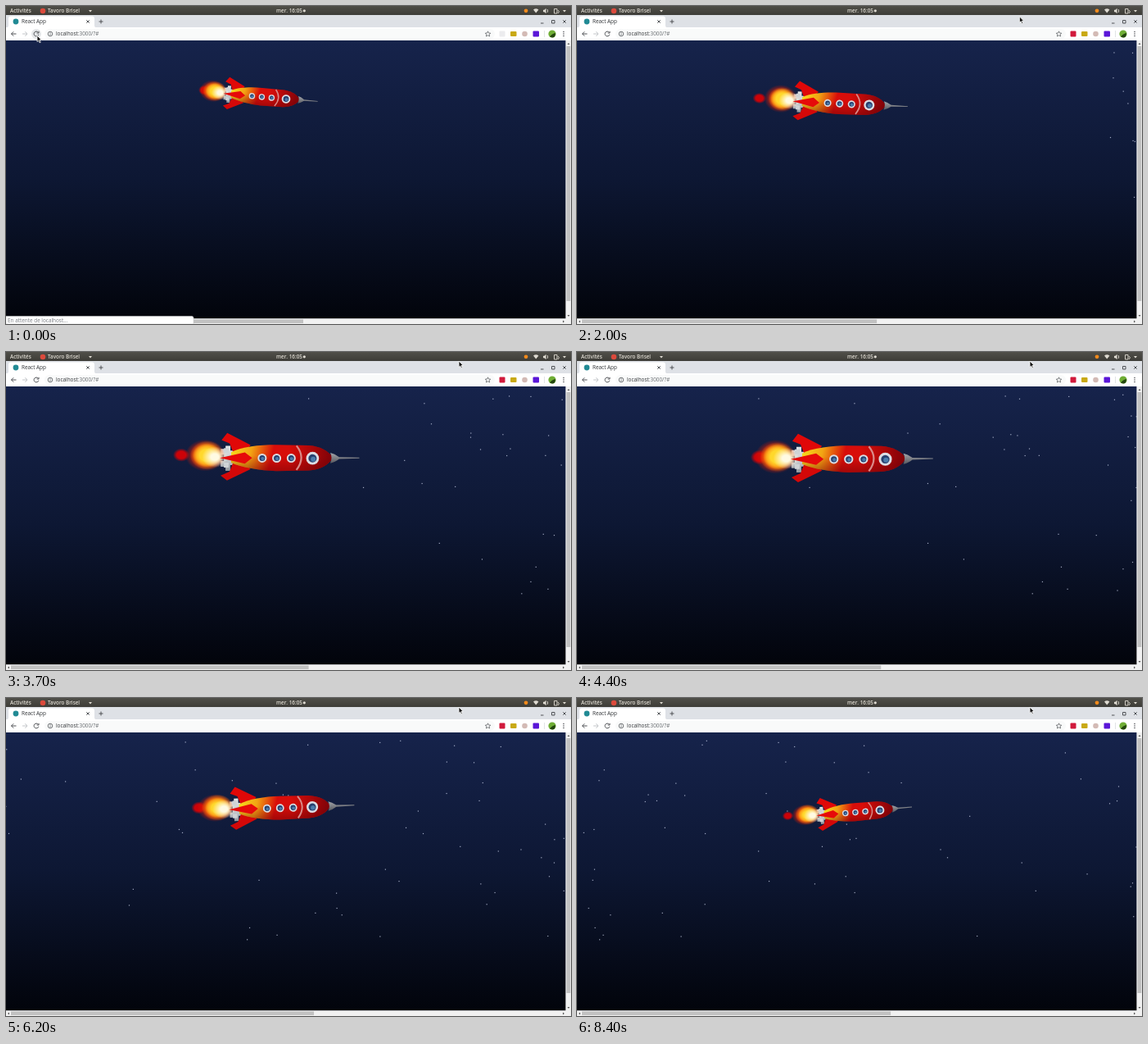
Recreate the animation shown at these times as an HTML page with a canvas. Size 690 by 388 pixels, loop 8500 ms.

```html
<!DOCTYPE html>
<html lang="fr">
<head>
<meta charset="utf-8">
<title>React App</title>
<style>
  html, body { margin: 0; width: 100%; height: 100%; overflow: hidden; background: #03050c; }
  canvas, svg { position: absolute; left: 0; top: 0; width: 690px; height: 388px; display: block; }
  text { font: 6.4px "Open Sans", sans-serif; fill: #303336; white-space: pre; }
  .panel text { font-size: 6.3px; font-weight: 600; fill: #dfdbd2; }
  .line { fill: none; stroke: #505357; stroke-width: 1; }
</style>
</head>
<body>
<canvas id="sky"></canvas>
<svg viewBox="0 0 690 388">
  <defs>
    <linearGradient id="panel" x2="0" y2="1">
      <stop stop-color="#504f49"/><stop offset="1" stop-color="#3c3b36"/>
    </linearGradient>
  </defs>

  <g class="panel">
    <rect width="690" height="12" fill="url(#panel)"/>
    <text x="5" y="8.2">Activités</text>
    <circle cx="45" cy="6" r="3.3" fill="#dc4a3c"/>
    <text x="51" y="8.2">Tavoro Brisel</text>
    <path d="M101 5h4l-2 2.5zM680 5h4l-2 2.5z" fill="#dfdbd2"/>
    <text x="330" y="8.2">mer. 16:05</text>
    <circle cx="364.3" cy="5.8" r="1.6" fill="#dfdbd2"/>
    <circle cx="635" cy="5.8" r="2.4" fill="#f28a1c"/>
    <path d="M644 4.5q3.2-2.6 6.4 0l-3.2 4zM656 4.7h1.5l2-2v6.5l-2-2h-1.5z" fill="#dfdbd2"/>
    <path d="M661 4q1.5 2 0 4M669.5 3.500h3.500v5.500h-3.500zM674 5l1.500 2-1.500 2" fill="none" stroke="#dfdbd2" stroke-width=".9"/>
  </g>

  <rect y="11" width="690" height="15.500" fill="#dee1e6"/>
  <path d="M0 26.500q3 0 3-3v-8q0-3 3-3h99q3 0 3 3v8q0 3 3 3z" fill="#fff"/>
  <circle cx="12" cy="19" r="3.400" fill="#218a94"/>
  <text x="19" y="21.300">React App</text>
  <path class="line" d="M98.300 17.300l3.400 3.400m0-3.400l-3.400 3.400M113.500 19h5M116 16.500v5M653 21h3.500M666.500 17.500h3.500v3.500h-3.500zM680.300 17.300l3.400 3.400m0-3.400l-3.400 3.400"/>

  <rect y="26" width="690" height="16" fill="#fff"/>
  <rect x="47" y="28" width="550" height="12" rx="6" fill="#f9fafa"/>
  <circle id="hover" cx="37" cy="34" r="6" fill="#e4e6e8"/>
  <path class="line" d="M12.500 34h-6m2.700-2.700l-2.700 2.700 2.700 2.700M39.300 32.200a2.900 2.900 0 1 0 .5 2.600M40 30.800v2.200h-2.300"/>
  <path class="line" d="M20 34h6m-2.700-2.700l2.700 2.700-2.700 2.700" style="stroke:#c3c6c9"/>
  <circle class="line" cx="54" cy="34" r="2.800" style="stroke-width:.8"/>
  <path class="line" d="M54 33.500v2M54 32v.8" style="stroke-width:.8"/>
  <text x="61" y="36.200">localhost<tspan fill="#666a6e">:3000/?#</tspan></text>
  <path class="line" d="M588.500 30.800l1 2.200 2.300.2-1.700 1.500.5 2.300-2.100-1.200-2.100 1.200.5-2.300-1.700-1.500 2.300-.2z" style="stroke-width:.7"/>
  <rect id="badge" x="602.500" y="30.500" width="7" height="7" rx="1"/>
  <rect x="616" y="31" width="7.500" height="6" rx="1" fill="#c9a916"/>
  <circle cx="633.500" cy="34" r="3.300" fill="#d3bab5"/>
  <rect x="643.500" y="30.500" width="7.500" height="7" rx="1" fill="#5a16d8"/>
  <path d="M657.500 30v8" stroke="#d5d8da" stroke-width=".7"/>
  <circle cx="667" cy="34" r="4.600" fill="#6fae35"/>
  <path d="M664 37.500q3-4 7-4.500 0 5.500-4 5.500z" fill="#24460f"/>
  <g fill="#505357"><circle cx="681" cy="31.500" r=".8"/><circle cx="681" cy="34" r=".8"/><circle cx="681" cy="36.500" r=".8"/></g>

  <path d="M683.400 42h6.600v346h-690v-6.800h683.400z" fill="#f1f1f1"/>
  <rect x="684.500" y="49" width="4.800" height="311" fill="#c1c1c1"/>
  <rect id="thumb" x="6" y="382.500" height="4.600" fill="#c1c1c1"/>
  <path d="M685.500 47h3l-1.500-2zM685.500 377h3l-1.500 2zM4 383.500v3l-2-1.500zM680 383.500v3l2-1.500z" fill="#5a5a5a"/>

  <g id="status">
    <path d="M0 378.500h227q2 0 2 2v7.500h-229z" fill="#fff" stroke="#c8c8c8" stroke-width=".5"/>
    <text x="2" y="385.500" style="fill:#777b80">En attente de localhost…</text>
  </g>
  <path id="cursor" d="M0 0v7.500l1.700-1.500 1.300 2.800 1.300-.6-1.300-2.700h2.300z" fill="#111" stroke="#fff" stroke-width=".8"/>
</svg>

<script>
const LOOP = 8500, STEP = 100, HALF_FLIGHT = 4.4, TAU = Math.PI * 2;
const byId = id => document.getElementById(id);
const canvas = byId('sky'), ctx = canvas.getContext('2d');
const ratio = window.devicePixelRatio || 1;
canvas.width = 690 * ratio;
canvas.height = 388 * ratio;

const poses = [
  { x: 342, y: 113.5, scale: .668, angle: 5 },
  { x: 376.5, y: 130.8, scale: 1.005, angle: 0 },
  { x: 369.8, y: 137, scale: .67, angle: -5 }
];

const clamp = u => Math.min(1, Math.max(0, u));
const ease = u => (1 - Math.cos(Math.PI * clamp(u))) / 2;
const mix = (a, b, u) => a + (b - a) * u;

function seeded(seed) {
  return () => (seed = seed * 16807 % 2147483647) / 2147483647;
}

const random = seeded(2024);
const stars = Array.from({ length: 72 }, () => ({
  y: mix(50, 298, random()),
  start: mix(.6, 8.2, random()),
  duration: mix(3.5, 11.5, random())
}));

function gradient(x0, y0, x1, y1, ...stops) {
  const g = ctx.createLinearGradient(x0, y0, x1, y1);
  stops.forEach(([at, color]) => g.addColorStop(at, color));
  return g;
}

function fillPath(d, fill) {
  ctx.fillStyle = fill;
  ctx.fill(new Path2D(d));
}

function disc(x, y, r, fill) {
  ctx.fillStyle = fill;
  ctx.beginPath();
  ctx.arc(x, y, r, 0, TAU);
  ctx.fill();
}

// soft ellipse, opaque out to `core` and fading to its rim
function puff(x, y, rx, ry, rgb, core) {
  ctx.save();
  ctx.translate(x, y);
  ctx.scale(rx, ry);
  const g = ctx.createRadialGradient(0, 0, 0, 0, 0, 1);
  g.addColorStop(0, `rgb(${rgb})`);
  g.addColorStop(core, `rgb(${rgb})`);
  g.addColorStop(1, `rgba(${rgb},0)`);
  disc(0, 0, 1, g);
  ctx.restore();
}

function drawStars(t) {
  ctx.fillStyle = 'rgba(225,232,255,.7)';
  for (const { y, start, duration } of stars) {
    const x = mix(690, -10, ease((t - start) / duration));
    ctx.fillRect(x - .6, y - .6, 1.2, 1.2);
  }
}

function drawFlame(t) {
  const p = t / .29 % 1, sway = Math.sin(t * 23), beat = Math.sin(t * 37);
  puff(-150 - 17 * p, -3 + sway, 11 - p, 9 - p, '204,2,8', .55);
  puff(-134 - beat, -3, 25, 20 + sway, '218,26,6', .5);
  puff(-131, -3 + sway * .5, 22 + beat, 18, '252,128,12', .6);
  puff(-130 + beat, -3, 18, 15 + sway, '255,216,44', .5);
  puff(-121 + sway, -1, 16, 13, '255,250,226', .3);
}

function drawRocket(t) {
  const leg = t < HALF_FLIGHT ? 0 : 1;
  const u = ease(t / HALF_FLIGHT - leg);
  const pose = key => mix(poses[leg][key], poses[leg + 1][key], u);
  ctx.save();
  ctx.translate(pose('x'), pose('y'));
  ctx.rotate(pose('angle') * Math.PI / 180);
  ctx.scale(pose('scale'), pose('scale'));

  fillPath('M-108-15h6v6h4v18h-4v7h-6v-5h-6v-7h4v-8h-4v-7h6z',
    gradient(0, -15, 0, 16, [0, '#e3e6e8'], [.6, '#c2c7cc'], [1, '#8f959c']));
  drawFlame(t);
  fillPath('M-110-12h6v6h-6zM-110 6h6v6h-6z', '#cfd3d6');

  fillPath('M-106-31L-77-16-85-6-99-8-103-18-113-22Z', '#e00808');
  fillPath('M-106 28L-77 14-85 5-99 7-103 17-114 22Z', '#d40808');

  const hull = 'M-101-7C-88-14-65-16.500-45-16.500L-5-16C10-15 20-9 25-1C20 8 10 14-5 15L-45 16C-65 15.500-88 12-101 6Z';
  fillPath(hull, gradient(-101, -6, -44, 8,
    [0, '#f6d91c'], [.4, '#f2a313'], [.65, '#e4500c'], [.85, '#d80d0a']));
  fillPath(hull, gradient(-30, 0, 25, 0, [0, 'rgba(120,0,6,0)'], [1, 'rgba(110,0,8,.85)']));
  fillPath(hull, gradient(0, -3, 0, 16, [0, 'rgba(100,0,6,0)'], [1, 'rgba(100,0,6,.45)']));

  ctx.strokeStyle = '#d98a88';
  ctx.lineWidth = 2.2;
  ctx.stroke(new Path2D('M-20-15.500Q-8-1-20 14.500'));

  fillPath('M-115 0L-84-7-75 0-84 7Z', '#e60a0a');
  fillPath('M22-7Q27-6 33-1.800L58-1.400V-.200L33 .600Q27 5 22 6Q25-1 22-7Z',
    gradient(0, -7, 0, 6, [0, '#a3a5aa'], [1, '#57595f']));

  const porthole = (x, r) => {
    disc(x, 0, r, '#dcdee4');
    disc(x, 0, r * .64, '#27406f');
    disc(x + r * .1, r * .12, r * .38, '#4b7cab');
  };
  for (let i = 0; i < 3; i++) porthole(-62.5 + 18 * i, 5.6);
  porthole(0, 8);
  ctx.restore();
}

// reload button, then the page, then the panel, then a small drop to rest
function pointerAt(t) {
  const toPage = clamp((t - .3) / .8), toPanel = ease((t - 1.1) / 1.1), toRest = ease((t - 2.8) / .6);
  return [38 + 298 * toPage + 222 * toPanel - 5 * toRest, 36 + 44 * toPage - 73 * toPanel + 4 * toRest];
}

function render(ms) {
  const t = Math.floor(ms % LOOP / STEP) * STEP / 1000;
  ctx.setTransform(ratio, 0, 0, ratio, 0, 0);
  ctx.fillStyle = gradient(0, 42, 0, 382, [0, '#16234b'], [.5, '#0d1733'], [1, '#02040b']);
  ctx.fillRect(0, 0, 690, 388);
  drawStars(t);
  drawRocket(t);

  const loading = t < .6;
  byId('thumb').setAttribute('width', 357 + 1.3 * t + .13 * t * t);
  byId('cursor').setAttribute('transform', `translate(${pointerAt(t)})`);
  byId('status').style.display = loading ? '' : 'none';
  byId('hover').style.display = t < .4 ? '' : 'none';
  byId('badge').setAttribute('fill', loading ? '#ececee' : '#d11a3c');
}

const start = performance.now();
function tick() {
  render(performance.now() - start);
  requestAnimationFrame(tick);
}
tick();
</script>
</body>
</html>
```
